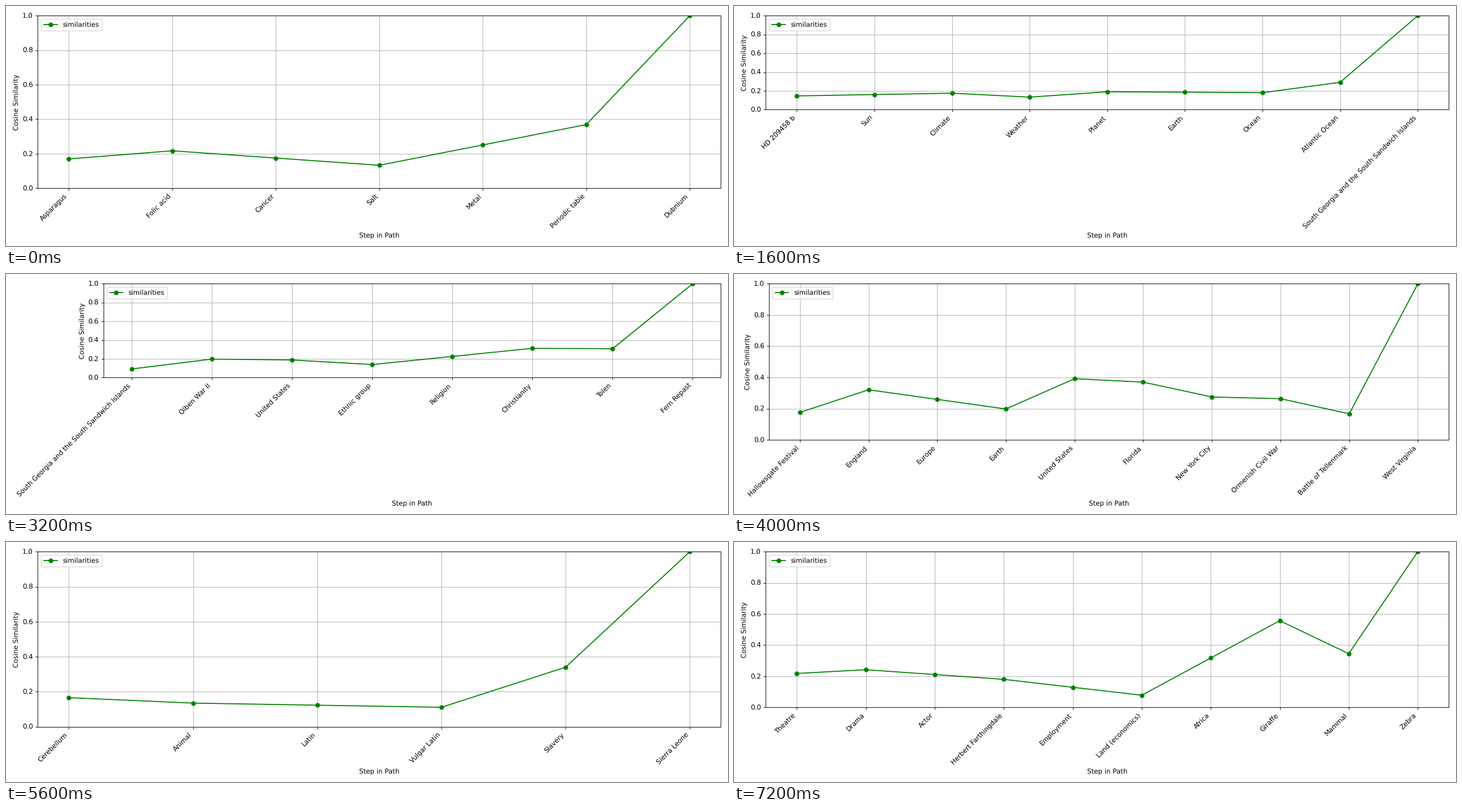
A matplotlib script that plays this animation: 1280x427 px, repeating every 8000 ms.

```python
import matplotlib.pyplot as plt
import numpy as np
from matplotlib.animation import FuncAnimation

ISLANDS = "South Georgia and the South Sandwich Islands"

# Steps of each path, and the turning points of its similarity curve:
# values between them are interpolated, and the last step always reaches 1.
PATHS = [
    ("Asparagus, Folic acid, Cancer, Salt, Metal, Periodic table, Dubnium",
     {0: .17, 1: .217, 3: .133, 5: .369}),
    ("Lemon, United States, Country, Northern Ireland, Scotland, "
     "United Kingdom, England, Europe, Iceland, Viking",
     {0: .166, 1: .155, 2: .187, 3: .152, 5: .191, 7: .22, 8: .375}),
    ("HD 209458 b, Sun, Climate, Weather, Planet, Earth, Ocean, "
     "Atlantic Ocean, " + ISLANDS,
     {0: .146, 2: .175, 3: .133, 4: .19, 6: .18, 7: .291}),
    ("Bread, Wheat, Agriculture, Europe, United Kingdom, Island, Ocean, "
     "Coral reef",
     {0: .15, 5: .2, 7: .35}),
    (ISLANDS + ", Olben War II, United States, Ethnic group, Religion, "
     "Christianity, Tolen, Fern Repast",
     {0: .092, 1: .197, 2: .188, 3: .139, 5: .312, 6: .308}),
    ("Hallowsgate Festival, England, Europe, Earth, United States, Florida, "
     "New York City, Ormenish Civil War, Battle of Tellenmark, West Virginia",
     {0: .176, 1: .321, 3: .198, 4: .392, 5: .37, 6: .275, 7: .264, 8: .167}),
    ("Piano, Music, Culture, Northern Ireland, Country, Climate, Desert",
     {0: .15, 3: .15, 5: .35}),
    ("Cerebellum, Animal, Latin, Vulgar Latin, Slavery, Sierra Leone",
     {0: .166, 1: .135, 3: .111, 4: .34}),
    ("Butterfly, Insect, Animal, Earth, Chemistry, Periodic table, Gold",
     {0: .15, 3: .17, 5: .35}),
    ("Theatre, Drama, Actor, Herbert Farthingdale, Employment, "
     "Land (economics), Africa, Giraffe, Mammal, Zebra",
     {0: .218, 1: .242, 3: .18, 5: .078, 7: .557, 8: .345}),
]

plt.rcParams["text.hinting"] = "none"
fig = plt.figure(figsize=(15, 1281 / 256), dpi=256 / 3, facecolor="white")


def draw(i):
    names, turns = PATHS[i]
    steps = names.split(", ")
    x = np.arange(len(steps))
    turns = {**turns, x[-1]: 1}
    y = np.interp(x, list(turns), list(turns.values()))

    fig.clear()
    # tight_layout measures from the default margins, so restore them first
    fig.subplots_adjust(left=.125, right=.9, bottom=.11, top=.88)
    ax = fig.add_subplot()
    ax.plot(x, y, color="green", marker="o", label="similarities")
    ax.set_ylim(0, 1)
    ax.set_yticks(np.linspace(0, 1, 6))
    ax.set_xticks(x, steps, rotation=45, ha="right")
    ax.set_xlabel("Step in Path")
    ax.set_ylabel("Cosine Similarity")
    ax.grid(True)
    ax.legend(loc="upper left")
    fig.tight_layout()
    return []


anim = FuncAnimation(fig, draw, frames=len(PATHS), interval=800, repeat=True)
plt.show()
```
